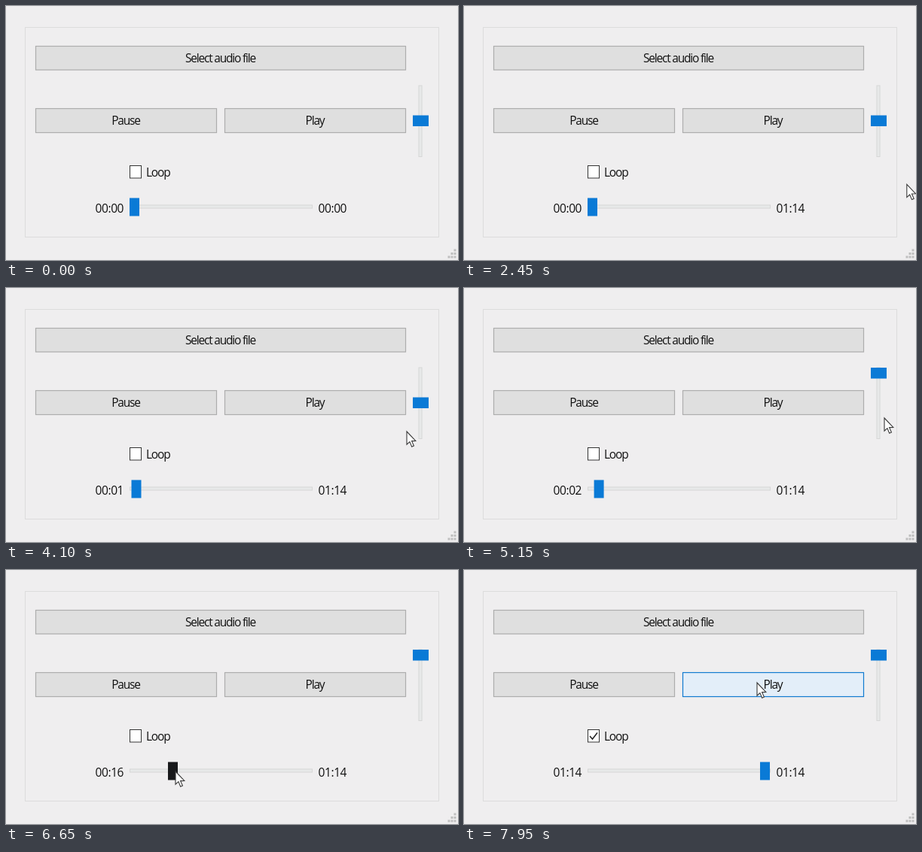
Animation of 600x338 px, one loop 8000 ms. Source, as an HTML page with a canvas:

```html
<!DOCTYPE html>
<html lang="en">
<head>
<meta charset="utf-8">
<title>Audio player</title>
<style>
html, body { margin: 0; width: 100%; height: 100%; overflow: hidden; background: #efeeef; }
canvas { display: block; width: 600px; height: 338px; }
</style>
</head>
<body>
<canvas id="stage" width="600" height="338"></canvas>
<script>
const ctx = document.getElementById('stage').getContext('2d');
const LOOP = 8000, STEP = 50, FADE = 6;
const DURATION = 74, LOADED = 2050;
const BLUE = '#0a7ad6', DARK = '#18191b', GRAY = '#cccccc';

// Cursor stops: time and place.
const visits = [
  [[600, 250, 62], [1150, 160, 76], [1350, 135, 98], [1550, 89, 178], [1800, 89, 178], [1900, 598, 255]],
  [[2400, 598, 240], [2650, 500, 215], [2900, 500, 215], [3100, 449, 157], [3400, 446, 159],
   [3700, 448, 163], [4100, 532, 191], [4500, 551, 154], [4600, 551, 154], [4850, 551, 100],
   [5150, 558, 173], [5450, 540, 190], [5800, 200, 155], [6200, 196, 158], [6400, 186, 268],
   [6450, 186, 268], [6600, 225, 268], [6700, 225, 268], [6900, 174, 220], [7050, 174, 220],
   [7200, 225, 268], [7250, 225, 268], [7500, 405, 270], [7700, 392, 160], [7950, 389, 150]]
];
const clicks = { select: [950, 1100], play: [3150, 3300], pause: [5850, 5950], loop: [6900, 6950] };
const volumeDrag = [4600, 4850];
const seekDrags = [[6450, 6600], [7250, 7500]];
const presses = [...Object.values(clicks), volumeDrag, ...seekDrags];

const buttons = [
  { x: 39, y: 53, w: 492, h: 32.5, text: 'Select audio file' },
  { x: 39, y: 136, w: 241, h: 33, text: 'Pause' },
  { x: 290, y: 136, w: 241, h: 33, text: 'Play' }
];
const loopArea = { x: 164, y: 212, w: 54, h: 18 };

const clamp = (v, lo, hi) => Math.max(lo, Math.min(hi, v));
const ease = u => u * u * (3 - 2 * u);
const mix = (a, b, u) => a.map((v, i) => v + (b[i] - v) * u);
const css = c => `rgb(${c.map(Math.round).join(',')})`;
const isPressed = t => presses.some(([down, up]) => t >= down && t < up);

function cursorAt(t) {
  const stops = visits.find(v => t >= v[0][0] && t <= v[v.length - 1][0]);
  if (!stops) return null;
  const i = Math.max(1, stops.findIndex(s => s[0] >= t));
  const [t0, ...from] = stops[i - 1], [t1, ...to] = stops[i];
  return mix(from, to, ease((t - t0) / (t1 - t0)));
}

function isOver(r, t) {
  const c = cursorAt(t);
  return !!c && c[0] >= r.x && c[0] < r.x + r.w && c[1] >= r.y && c[1] < r.y + r.h;
}

// Share of the latest moments for which a state held, which fades it in and out.
function recent(test, t) {
  let n = 0;
  for (let i = 0; i < FADE; i++) if (test(t - i * STEP)) n++;
  return n / FADE;
}

function fill(x, y, w, h, color) {
  ctx.fillStyle = color;
  ctx.fillRect(x, y, w, h);
}

function box(x, y, w, h, inside, edge, line = 1) {
  fill(x, y, w, h, inside);
  ctx.lineWidth = line;
  ctx.strokeStyle = edge;
  ctx.strokeRect(x + .5, y + .5, w - 1, h - 1);
}

function label(text, x, y, spacing, align = 'left') {
  ctx.font = '500 15.5px "Open Sans", "Noto Sans", sans-serif';
  ctx.letterSpacing = spacing + 'px';
  ctx.textAlign = align;
  ctx.fillStyle = '#111111';
  ctx.fillText(text, x, y);
}

function drawButton(b, t) {
  const hover = recent(s => isOver(b, s), t);
  const press = recent(s => isOver(b, s) && isPressed(s), t);
  const inside = mix([223, 223, 223], mix([227, 238, 249], [204, 228, 247], press), hover);
  const edge = mix([173, 173, 173], mix([16, 122, 208], [0, 84, 153], press), hover);
  box(b.x, b.y, b.w, b.h, css(inside), css(edge), 1.2);
  label(b.text, b.x + b.w / 2 - .5, b.y + b.h / 2 + 5.7, -1.2, 'center');
}

function drawHandle(x, y, w, h, t, dragged) {
  const over = isOver({ x, y, w, h }, t);
  fill(x, y, w, h, over && dragged ? GRAY : over ? DARK : BLUE);
}

function drawLoop(t) {
  box(164, 212, 16, 17.5, '#ffffff', isOver(loopArea, t) ? BLUE : '#333333');
  if (t >= clicks.loop[1]) {
    ctx.beginPath();
    ctx.moveTo(167, 221);
    ctx.lineTo(170.5, 225);
    ctx.lineTo(177, 216.5);
    ctx.lineWidth = 1.5;
    ctx.strokeStyle = '#222222';
    ctx.stroke();
  }
  label('Loop', 186, 227, -1.2);
}

function drawGrip() {
  for (let row = 0; row < 3; row++)
    for (let col = 2 - row; col < 3; col++)
      fill(586.5 + 4 * col, 323.5 + 4.5 * row, 3, 3, '#bfbfbf');
}

function drawCursor([x, y]) {
  const points = [[0, 0], [0, 17.2], [3.9, 13.6], [6.7, 20.2], [9.4, 19], [6.6, 12.6], [11.8, 12.4]];
  ctx.beginPath();
  points.forEach(([px, py]) => ctx.lineTo(x + px, y + py));
  ctx.closePath();
  ctx.fillStyle = '#ffffff';
  ctx.fill();
  ctx.lineWidth = 1.1;
  ctx.strokeStyle = '#383838';
  ctx.stroke();
}

function volumeY(t) {
  const c = cursorAt(clamp(t, ...volumeDrag));
  return clamp(c[1] - 8.5, 106, 145.5);
}

// Playback moves the handle in ticks until paused, then it follows the drags.
function seekX(t) {
  const drag = seekDrags.filter(d => t >= d[0]).pop();
  if (drag) return clamp(cursorAt(Math.min(t, drag[1]))[0] - 10, 164, 393);
  const tick = Math.floor((Math.min(t, clicks.pause[1]) - 3540) / 520);
  return tick > 0 ? 163.45 + 3.05 * tick : 164;
}

function clock(s) {
  const two = n => String(n).padStart(2, '0');
  return two(Math.floor(s / 60)) + ':' + two(s % 60);
}

function draw(t) {
  fill(0, 0, 600, 338, '#efeeef');
  box(25, 28, 550, 280, '#efeeef', '#dcdcdc');
  buttons.forEach(b => drawButton(b, t));

  box(547.5, 105.5, 5, 95.5, '#e7e9e9', '#d7d7d7');
  drawHandle(540, volumeY(t), 21, 14.5, t, isPressed(t));
  drawLoop(t);

  const x = seekX(t);
  box(164, 264.5, 243, 5, '#e7e9e9', '#d7d7d7');
  drawHandle(x, 255.5, 13, 24, t, isPressed(t));
  label(clock(Math.floor((x - 164) / 229 * DURATION + .2)), 118.5, 274.5, -.4);
  label(clock(t < LOADED ? 0 : DURATION), 414.5, 274.5, -.4);

  drawGrip();
  const cursor = cursorAt(t);
  if (cursor) drawCursor(cursor);
}

const start = performance.now();
function frame() {
  const t = (performance.now() - start) % LOOP;
  draw(Math.floor(t / STEP) * STEP);
  requestAnimationFrame(frame);
}
frame();
</script>
</body>
</html>
```
